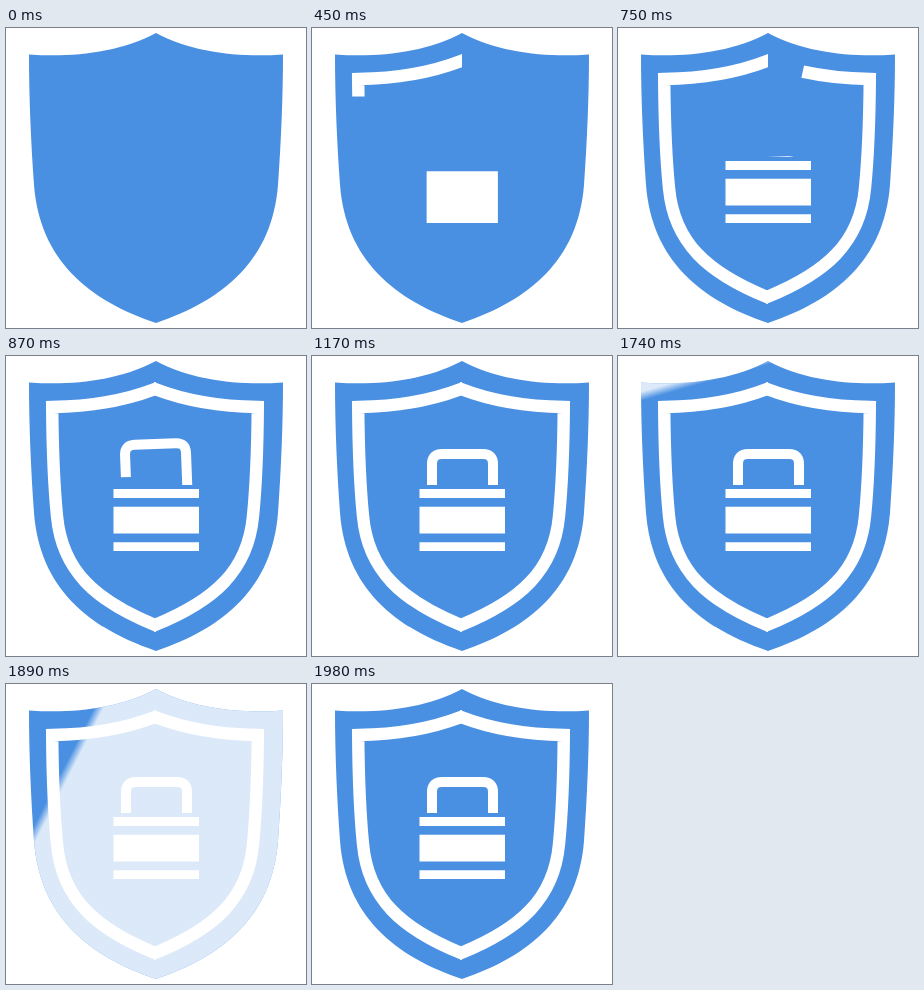
Recreate the animation shown at these times as an HTML page. Size 300 by 300 pixels, loop 2.28 s.

```html
<!DOCTYPE html>
<html lang="en">
<head>
<meta charset="utf-8">
<title>Shield and padlock</title>
<style>
  html, body { margin: 0; width: 100%; height: 100%; overflow: hidden; background: #fff; }
  svg { display: block; width: 100%; height: 100%; }
</style>
</head>
<body>
<svg viewBox="0 0 300 300">
  <defs>
    <path id="shield" d="M150 5C112 25 66 29.5 23 26.5C23 70 25 115 28 157C34 232 82 272 150 295C218 272 266 232 272 157C275 115 277 70 277 26.5C234 29.5 188 25 150 5Z"/>
    <clipPath id="inShield"><use href="#shield"/></clipPath>
    <clipPath id="halfSide"><rect x="-130" width="131" height="300"/></clipPath>
    <clipPath id="aboveBody"><rect width="300" height="129"/></clipPath>
    <linearGradient id="band" x2="0" y2="1">
      <stop offset="0" stop-color="#fff" stop-opacity="0"/>
      <stop offset=".02" stop-color="#fff" stop-opacity=".8"/>
      <stop offset=".98" stop-color="#fff" stop-opacity=".8"/>
      <stop offset="1" stop-color="#fff" stop-opacity="0"/>
    </linearGradient>
    <path id="rim" pathLength="1" d="M6 30.6L0 33C-31 45-67 50.5-102.8 51C-102.5 90-101 130-98 160C-93 215-59 245 0 269L6 271.4"/>
  </defs>

  <use href="#shield" fill="#4a90e2"/>
  <g clip-path="url(#inShield)">
    <rect id="shine" x="-400" width="800" height="437" fill="url(#band)"/>
  </g>

  <g fill="none" stroke="#fff" stroke-width="12.4">
    <g transform="translate(149)" clip-path="url(#halfSide)"><use id="left" href="#rim"/></g>
    <g transform="translate(149) scale(-1 1)" clip-path="url(#halfSide)"><use id="right" href="#rim"/></g>
  </g>

  <g clip-path="url(#aboveBody)">
    <path id="shackle" fill="none" stroke="#fff" stroke-width="10" d="M120 130V108Q120 98 130 98H171Q181 98 181 108V155"/>
  </g>

  <g id="body" fill="#fff">
    <path id="plates"/>
  </g>
</svg>
<script>
  const LOOP = 2280, STEP = 30;
  const el = id => document.getElementById(id);
  const set = (id, name, value) => el(id).setAttribute(name, value);
  const ramp = (t, from, to) => Math.min(1, Math.max(0, (t - from) / (to - from)));
  const sine = x => (1 - Math.cos(Math.PI * x)) / 2;
  const smooth = x => x * x * (3 - 2 * x);
  const plate = (top, bottom) => `M107.5 ${top}H193V${bottom}H107.5Z`;

  function draw(t) {
    // Rim: down the left side, then up the right side
    const drawn = 2 * sine(ramp(t, 310, 830));
    const rightPart = Math.max(0, drawn - 1);
    set('left', 'stroke-dasharray', `${Math.min(1, drawn)} 2`);
    set('right', 'stroke-dasharray', `${rightPart} 2`);
    set('right', 'stroke-dashoffset', rightPart - 1);

    // Lock body grows from its base, then splits into three plates
    const size = ramp(t, 300, 480);
    set('body', 'transform', `translate(150.25 195) scale(${size}) translate(-150.25 -195)`);
    const gap = (13.4 * ramp(t, 480, 600) - 4.6 * ramp(t, 600, 690)) / 2;
    set('plates', 'd', plate(133, 146.4 - gap) + plate(146.4 + gap, 181.9 - gap) + plate(181.9 + gap, 195));

    // Shackle rises open, waits, and snaps shut
    const rise = smooth(ramp(t, 720, 900));
    const close = smooth(ramp(t, 990, 1170));
    const open = 1 - close;
    const y = 40 - 54 * rise + 14 * close;
    set('shackle', 'transform', `translate(${-0.7 * open} ${y}) rotate(${-2.2 * open} 150.5 115)`);

    // Wide light band turning as it crosses the shield
    const since = t - 1740;
    const trail = -573 + 3.07 * since;
    set('shine', 'transform', `translate(150 150) rotate(${-16 - 47 * since / 150}) translate(0 ${trail})`);
  }

  const start = performance.now();
  function tick() {
    const t = (performance.now() - start) % LOOP;
    draw(Math.floor(t / STEP) * STEP);
    requestAnimationFrame(tick);
  }
  tick();
</script>
</body>
</html>
```
